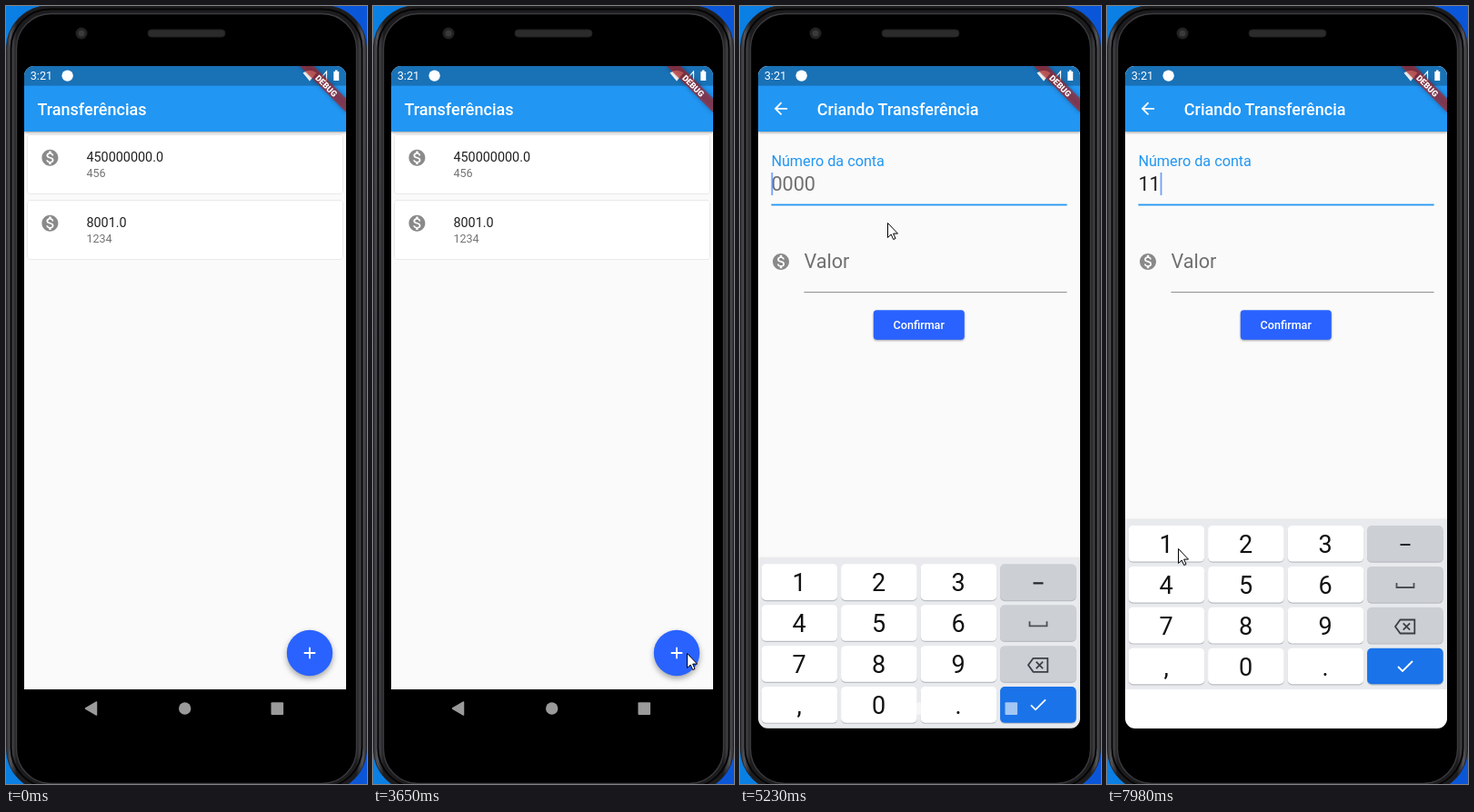
Recreate the animation shown at these times as an HTML page. Size 397 by 855 pixels, loop 8000 ms.

```html
<!DOCTYPE html>
<html lang="pt">
<head>
<meta charset="utf-8">
<style>
html, body { margin: 0; width: 100%; height: 100%; overflow: hidden; background: #0a62cf; }
svg { display: block; width: 397px; height: 855px; font-family: Roboto, "Noto Sans", sans-serif; }
.bar { fill: #2196f3; filter: drop-shadow(0 1.5px 1.5px rgba(0,0,0,.38)); }
.head { font-size: 18px; font-weight: 500; fill: #fff; }
.card { fill: #fff; filter: drop-shadow(0 .8px .7px rgba(0,0,0,.32)); }
.item { font-size: 14.4px; fill: #212121; }
.sub { font-size: 12.6px; fill: #757575; }
.big { font-size: 21.6px; }
.key text { font-size: 27px; fill: #111; text-anchor: middle; }
</style>
</head>
<body>
<svg viewBox="0 0 397 855">
  <defs>
    <linearGradient id="desk">
      <stop offset="0" stop-color="#0a80e4"/><stop offset="1" stop-color="#0a55d8"/>
    </linearGradient>
    <linearGradient id="metal" gradientUnits="userSpaceOnUse" x1="0" x2="397">
      <stop offset="0" stop-color="#2a2a2d"/><stop offset=".012" stop-color="#55555a"/>
      <stop offset=".03" stop-color="#1c1c1e"/><stop offset=".97" stop-color="#1c1c1e"/>
      <stop offset=".988" stop-color="#55555a"/><stop offset="1" stop-color="#2a2a2d"/>
    </linearGradient>
    <clipPath id="screen"><rect x="20" y="66" width="354" height="728" rx="11"/></clipPath>
    <path id="coin" transform="scale(.9) translate(-12 -12)" d="M12 2C6.48 2 2 6.48 2 12s4.48 10 10 10 10-4.48 10-10S17.52 2 12 2zm1.41 16.09V20h-2.67v-1.93c-1.71-.36-3.16-1.46-3.27-3.4h1.96c.1 1.05.82 1.87 2.65 1.87 1.96 0 2.4-.98 2.4-1.59 0-.83-.44-1.61-2.67-2.14-2.48-.6-4.18-1.62-4.18-3.67 0-1.72 1.39-2.84 3.11-3.21V4h2.67v1.95c1.86.45 2.79 1.86 2.85 3.39H14.3c-.05-1.11-.64-1.87-2.22-1.87-1.5 0-2.4.68-2.4 1.64 0 .84.65 1.39 2.67 1.91s4.18 1.39 4.18 3.91c-.01 1.83-1.38 2.83-3.12 3.16z"/>
    <g id="navIcons">
      <path d="M87.500 772L99.500 765V779Z" stroke-width="1.500" stroke-linejoin="round"/>
      <circle cx="196.700" cy="772" r="6.700"/>
      <rect x="291.500" y="765.300" width="13.600" height="13.600" rx="1"/>
    </g>
  </defs>

  <!-- phone -->
  <rect width="397" height="855" fill="url(#desk)"/>
  <rect x=".5" y="-.5" width="396" height="864" rx="47" fill="url(#metal)" stroke="#242428"/>
  <rect x="5.500" y="3.500" width="386" height="855" rx="43" fill="none" stroke="#050505" stroke-width="2"/>
  <rect x="11.500" y="8.500" width="374" height="846" rx="38" stroke="#3c3c40" stroke-width="1.400"/>
  <circle cx="83" cy="30" r="6.500" fill="#222"/><circle cx="83" cy="30" r="3.500" fill="#3a3a3d"/>
  <rect x="156" y="26" width="85" height="8" rx="4" fill="#2b2b2b" stroke="#202020"/>

  <g clip-path="url(#screen)">
    <!-- list -->
    <rect x="20" y="66" width="354" height="685" fill="#fafafa"/>
    <g id="cards"></g>
    <rect class="bar" x="20" y="66" width="354" height="72"/>
    <text class="head" x="34.400" y="119.500">Transferências</text>
    <circle cx="334" cy="711" r="25.200" fill="#2962ff" style="filter:drop-shadow(0 3px 3px rgba(0,0,0,.35))"/>
    <circle id="splash" cx="334" cy="711" fill="#fff" fill-opacity=".16"/>
    <path d="M327.700 711h12.600M334 704.700v12.600" stroke="#fff" stroke-width="1.800"/>

    <!-- form -->
    <g id="form">
      <rect x="20" y="66" width="354" height="685" fill="#fafafa"/>
      <rect class="bar" x="20" y="66" width="354" height="72"/>
      <path transform="translate(44.900 112.800) scale(.9) translate(-12 -12)" fill="#fff" d="M20 11H7.830l5.590-5.590L12 4l-8 8 8 8 1.410-1.410L7.830 13H20v-2z"/>
      <text class="head" x="84.800" y="119.500">Criando Transferência</text>
      <text class="big" id="label">Número da conta</text>
      <text class="big" id="entry" x="34.400" y="203"></text>
      <rect id="caret" y="183" width="1.800" height="25" fill="#4285f4" opacity=".75"/>
      <rect id="line" x="34.400" width="325.200"/>
      <use href="#coin" x="45" y="281" fill="#898989"/>
      <text class="big" x="70.400" y="288" fill="#707070">Valor</text>
      <rect x="70.400" y="314" width="289.200" height="1" fill="#919191"/>
      <rect x="146.800" y="334.300" width="100" height="32.400" rx="3.600" fill="#2962ff" style="filter:drop-shadow(0 1.200px 1px rgba(0,0,0,.35))"/>
      <text x="196.700" y="355.300" font-size="12.600" font-weight="500" fill="#fff" text-anchor="middle">Confirmar</text>
    </g>

    <!-- system bars -->
    <rect x="20" y="66" width="354" height="21.600" fill-opacity=".25"/>
    <text x="26.800" y="81.200" font-size="12.600" fill="#fff">3:21</text>
    <g fill="#fff">
      <circle cx="67.600" cy="76.600" r="6.200"/>
      <path d="M326.500 73.500Q334 68 341.500 73.500L334 82.500Z"/>
      <path d="M360.300 72h1.600v-1.400h2.600v1.400h1.700v10h-5.900z"/>
      <path d="M344 81.700L352.500 72V81.700Z" fill="none" stroke="#fff" stroke-width="1.200"/>
    </g>
    <g transform="translate(374 66) rotate(45)">
      <rect x="-36" y="25.200" width="72" height="10.800" fill="#b71c1c" fill-opacity=".63" style="filter:drop-shadow(0 0 2.500px rgba(0,0,0,.5))"/>
      <text y="34" font-size="9.200" font-weight="900" fill="#fff" text-anchor="middle">DEBUG</text>
    </g>
    <rect x="20" y="751" width="354" height="43"/>
    <use href="#navIcons" fill="#9a9a9a" stroke="#9a9a9a" stroke-width="0"/>

    <!-- keyboard -->
    <g id="board">
      <rect x="20" y="565" width="354" height="186" fill="#e8eaed" style="filter:drop-shadow(0 -1px 1px rgba(0,0,0,.1))"/>
      <rect x="20" y="751" width="354" height="43" fill="#fff"/>
      <g id="keys" class="key"></g>
      <g fill="none" stroke="#24272b" stroke-width="1.800">
        <path d="M322.500 592h11" stroke-width="2.200"/>
        <path d="M318.500 634v5h19v-5" stroke="#4c5056"/>
        <path d="M322.500 674.500H338.300V689.500H322.500L317 682ZM325.700 678.300l7.400 7.400M333.100 678.300l-7.400 7.400" stroke="#3c4046"/>
        <path d="M320 726l5 5 11-11" stroke="#fff"/>
      </g>
    </g>
    <use id="ghost" href="#navIcons" fill="#fff" fill-opacity=".6"/>
  </g>

  <path id="mouse" d="M.5 .5V16.500L4.200 13 6.700 18.500 9 17.500 6.600 12.100H11.500Z" fill="#fff" stroke="#000" stroke-width="1"/>
</svg>

<script>
const $ = id => document.getElementById(id);
const LOOP = 8000, PUSH = 3880, FOCUS = 4820, KEYBOARD = 5060;
const TYPED = [6480, 7600];

$('cards').innerHTML = [['450000000.0', '456'], ['8001.0', '1234']].map(([value, account], i) =>
  `<g transform="translate(0 ${i * 72})">
    <rect class="card" x="23.6" y="141.6" width="346.800" height="64.800" rx="3.600"/>
    <use href="#coin" x="48.400" y="166.800" fill="#8a8a8a"/>
    <text class="item" x="88.400" y="170.500">${value}</text>
    <text class="sub" x="88.400" y="188.300">${account}</text>
  </g>`).join('');

$('keys').innerHTML = [...'123 456 789 ,0.'.replaceAll(' ', '__') + '_']
  .filter((c, i, all) => c !== '_' || all[i - 1] !== '_')
  .map((c, i) => {
    const col = i % 4, x = 23.6 + col * 87.5, y = 571 + (i >> 2) * 44.9;
    const fill = col < 3 ? '#fff' : i === 15 ? '#1a73e8' : '#cccfd4';
    return `<rect x="${x}" y="${y + 1}" width="83.600" height="39.800" rx="5" fill="#b9bcc2"/>
      <rect x="${x}" y="${y}" width="83.600" height="39.600" rx="5" fill="${fill}" ${i ? '' : 'id="one"'}/>
      <text x="${x + 41.5}" y="${y + 30}">${col < 3 ? c : ''}</text>`;
  }).join('');

// pointer stops: time, x, y
const path = [
  [190, 343, 767], [500, 206, 545], [720, 105, 400], [850, 120, 309], [950, 150, 333],
  [1100, 185, 250], [1250, 193, 205], [1400, 170, 174], [1600, 135, 205], [1790, 123, 232],
  [1860, 130, 237], [2000, 122, 228], [2130, 118, 230], [2270, 118, 237], [2480, 73, 535],
  [2640, 47, 480], [2800, 163, 395], [3040, 244, 440], [3110, 244, 440], [3500, 345, 711],
  [3930, 345, 711], [4130, 258, 406], [4500, 165, 205], [4850, 158, 195], [5230, 162, 238],
  [5500, 186, 190], [5800, 135, 215], [6130, 66, 555], [6350, 72, 588], [6690, 74, 591],
  [6960, 74, 591], [7300, 80, 599], [7600, 84, 595], [7720, 106, 595], [7860, 106, 595],
  [7980, 78, 596]
];

const mix = (a, b, k) => a + (b - a) * k;
const clamp = v => Math.min(1, Math.max(0, v));
const phase = (t, start, span) => clamp((t - start) / span);

function bezier(x1, y1, x2, y2) {
  const at = (a, b, u) => 3 * a * u * (1 - u) ** 2 + 3 * b * u * u * (1 - u) + u ** 3;
  return x => {
    let lo = 0, hi = 1;
    for (let i = 0; i < 20; i++) {
      const mid = (lo + hi) / 2;
      if (at(x1, x2, mid) < x) lo = mid; else hi = mid;
    }
    return at(y1, y2, lo);
  };
}
const easeIn = bezier(.42, 0, 1, 1), standard = bezier(.4, 0, .2, 1);

function pointer(t) {
  const i = path.findIndex(p => p[0] > t);
  if (i < 0) return path.at(-1).slice(1);
  const a = path[Math.max(0, i - 1)], b = path[i];
  const k = phase(t, a[0], b[0] - a[0]), s = mix(k, k * k * (3 - 2 * k), .5);
  return [mix(a[1], b[1], s), mix(a[2], b[2], s)];
}

function set(id, attrs) {
  for (const name in attrs) $(id).setAttribute(name, attrs[name]);
}
const show = (id, on) => set(id, { visibility: on ? 'visible' : 'hidden' });

function draw(t) {
  const press = phase(t, 3720, 200);
  set('splash', { r: press < 1 ? 25.2 * press : 0 });

  const push = phase(t, PUSH, 300);
  set('form', { opacity: easeIn(push), transform: `translate(0 ${171 * (1 - standard(push))})` });

  const focused = t >= FOCUS, k = standard(phase(t, FOCUS, 200));
  const tint = [112, 112, 112].map((c, i) => mix(c, [33, 150, 243][i], k));
  set('label', {
    transform: `translate(34.4 ${mix(192, 175.7, k)}) scale(${mix(1, .75, k)})`,
    fill: `rgb(${tint})`
  });
  set('line', { y: focused ? 217.6 : 218, height: focused ? 1.8 : 1, fill: focused ? '#2196f3' : '#919191' });

  const count = TYPED.filter(at => t >= at).length;
  $('entry').textContent = count ? '1'.repeat(count) : '0000';
  set('entry', { fill: count ? '#212121' : '#707070', opacity: count ? 1 : k });
  const blinkFrom = count ? TYPED[count - 1] : FOCUS + 80;
  set('caret', { x: 34.4 + count * 12.1 });
  show('caret', focused && Math.floor((t - blinkFrom) / 500) % 2 === 0);

  const rise = phase(t, KEYBOARD, 300);
  set('board', { transform: `translate(0 ${229 * (1 - rise) ** 2})` });
  show('board', rise > 0);
  show('ghost', rise > 0);
  set('one', { fill: TYPED.some(at => t >= at - 80 && t < at + 40) ? '#dfe1e5' : '#fff' });

  const [x, y] = pointer(t);
  set('mouse', { transform: `translate(${Math.round(x)} ${Math.round(y)})` });
  show('mouse', t >= 190);
}

function tick() {
  draw(performance.now() % LOOP);
  requestAnimationFrame(tick);
}
tick();
</script>
</body>
</html>
```
